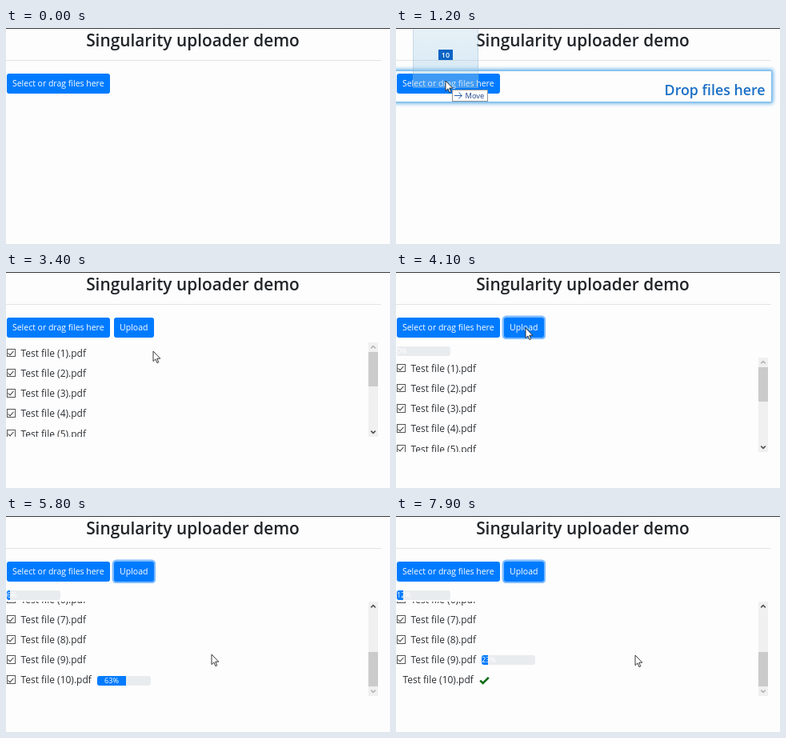
Write an HTML page that moves like this. It is 480 px wide and 270 px high and loops after 8 s.

```html
<!DOCTYPE html>
<html lang="en">
<head>
<meta charset="utf-8">
<title>Uploader demo</title>
<style>
@property --scroll { syntax: "<number>"; inherits: true; initial-value: 0; }
@property --pct { syntax: "<integer>"; inherits: true; initial-value: 0; }
@property --fill { syntax: "<number>"; inherits: true; initial-value: 0; }

html, body { margin: 0; width: 100%; height: 100%; overflow: hidden; }
body { background: #fdfdfd; }
*, ::before, ::after { box-sizing: border-box; }
.stage {
  position: relative; width: 480px; height: 270px; overflow: hidden;
  background: #fdfdfd; border-top: 1px solid #3a3a3c; color: #2b2f33;
  font: 12px/25.2px "Open Sans", "Noto Sans", sans-serif; white-space: nowrap;
}
.stage > * { position: absolute; margin: 0; }
.stage, .stage * { animation: 8s step-end infinite; animation-name: none; }

h1 { left: 0; top: -1px; width: 467px; text-align: center; color: #212529; font-size: 20.85px; font-weight: 600; line-height: 30px; }
.rule { left: 0; top: 39px; width: 469px; height: 1px; background: #e3e3e4; }
.btn {
  top: 56px; height: 24.5px; border-radius: 3px; background: #007bff; color: #fff;
  font-size: 10.5px; line-height: 25.5px; text-align: center;
}
.pick { left: 1px; width: 128.5px; }
.upload { left: 135px; width: 49.5px; }
.stage .upload { animation-name: after-drop, focus; }

.zone {
  left: -6px; top: 51.5px; width: 475.5px; height: 40px; padding-right: 7px;
  border: 1px solid #7dbdec; box-shadow: 0 0 5px 1px #4da3e6;
  color: #1a6fc6; font-size: 17.8px; font-weight: 600; line-height: 46px; text-align: right;
}
.stage .zone { animation-name: drag-over; }

/* progress bars: the fill trails the printed percentage */
.bar { display: block; width: 67px; height: 12px; border-radius: 3px; background: #e9ecef; overflow: hidden; }
.bar i {
  display: block; width: calc(var(--fill) * 1%); height: 100%; background: #007bff; color: #fff;
  font: 9.2px/12px "Open Sans", "Noto Sans", sans-serif; text-align: center;
}
.bar i::after { counter-reset: n var(--pct); content: counter(n) "%"; }
.total { left: 1px; top: 92px; }
.stage .total { animation-name: after-click, total; animation-timing-function: step-end, linear; }
.row .bar { margin: 1px 0 0 7px; }
.stage .ten { animation-name: ten; animation-timing-function: linear; }
.stage .nine { animation-name: second-file, nine; animation-timing-function: step-end, linear; }

/* file list */
.files { left: 0; top: 87px; width: 466px; height: 118px; overflow: hidden; }
.stage .files { animation-name: after-drop, shift, scroll; animation-timing-function: step-end, step-end, linear; }
.list { padding-top: .8px; transform: translateY(calc(var(--scroll) * -1px)); }
.row { position: relative; display: flex; align-items: center; height: 25.2px; padding-left: 18.5px; }
.row::before { content: ""; position: absolute; left: 1px; top: 7px; width: 10.5px; height: 10.5px; border: 1px solid #555; background: #fff; }
.row::after {
  content: ""; position: absolute; left: 4.3px; top: 8.2px; width: 4px; height: 7px;
  border: solid #444; border-width: 0 1.2px 1.2px 0; transform: rotate(42deg);
}
.stage .live { animation-name: before-done; }
.done { margin-top: -25.2px; padding-left: 8.5px; }
.stage .done { animation-name: second-file; }
.done::before, .done::after { display: none; }
.done svg { margin-left: 7px; }

.track { position: absolute; left: 453px; top: 0; width: 12px; height: 118px; background: #f0f0f0; }
.thumb { position: absolute; top: 11.5px; width: 12px; height: 43px; background: #cbcbcb; transform: translateY(calc(var(--scroll) * .359px)); }
.track svg { position: absolute; left: 0; color: #505050; }
.stage .up { top: 0; animation-name: up; }
.stage .down { bottom: 0; animation-name: down; }

/* pointer with the dragged files */
.pointer { left: 0; top: -1px; }
.stage .pointer { animation-name: move; animation-timing-function: ease-in-out; }
.pointer > * { position: absolute; }
.stage .drag { animation-name: before-drop; }
.drag > * { position: absolute; }
.ghost {
  left: -41px; top: -74px; width: 82px; height: 83px; border: 1px solid rgba(140, 170, 195, .3);
  background: linear-gradient(rgba(190, 218, 236, .3), rgba(150, 198, 230, .42));
}
.count { left: -9px; top: -39px; width: 18px; height: 13px; background: #0a63c4; color: #fff; font-size: 9px; font-weight: 600; line-height: 13px; text-align: center; }
.tip { left: 8px; top: 11px; width: 45px; height: 15px; padding-left: 15.5px; border: 1px solid #8f949a; background: #fff; color: #1c3f86; font-size: 9.3px; line-height: 13px; }
.tip svg { position: absolute; left: 1px; top: 1px; }
.arrow { left: -1px; top: -1px; }

@keyframes after-drop { 0% { opacity: 0 } 17.5%, 100% { opacity: 1 } }
@keyframes before-drop { 0% { opacity: 1 } 17.5%, 100% { opacity: 0 } }
@keyframes drag-over { 0% { opacity: 0 } 10% { opacity: 1 } 17.5%, 100% { opacity: 0 } }
@keyframes after-click { 0% { opacity: 0 } 48.75%, 100% { opacity: 1 } }
@keyframes focus { 0% { box-shadow: none } 48.75%, 100% { box-shadow: 0 0 0 2.4px rgba(0, 123, 255, .5) } }
@keyframes shift { 0% { transform: none } 48.75%, 100% { transform: translateY(19px) } }
@keyframes second-file { 0% { opacity: 0 } 90%, 100% { opacity: 1 } }
@keyframes before-done { 0% { opacity: 1 } 90%, 100% { opacity: 0 } }
@keyframes scroll {
  0%, 26.25% { --scroll: 0 }
  31.25% { --scroll: 61 }
  33.75%, 36.25% { --scroll: 142 }
  40%, 57.5% { --scroll: 0 }
  61.25% { --scroll: 75 }
  66.25%, 100% { --scroll: 142 }
}
@keyframes up {
  0%, 40% { color: #b4b4b4 }
  26.25%, 57.5%, 100% { color: #505050 }
}
@keyframes down {
  0%, 36.25% { color: #505050 }
  33.75%, 66.25%, 100% { color: #b4b4b4 }
}
@keyframes total {
  0%, 51.25% { --pct: 0; --fill: 0 }
  61.25% { --pct: 4; --fill: 3 }
  72.5% { --pct: 6; --fill: 6 }
  90% { --pct: 10; --fill: 10 }
  98.75%, 100% { --pct: 12; --fill: 12 }
}
@keyframes ten {
  0%, 51.25% { --pct: 0; --fill: 0 }
  61.25% { --pct: 36; --fill: 27 }
  72.5% { --pct: 63; --fill: 54 }
  86.25% { --pct: 100 }
  90%, 100% { --pct: 100; --fill: 100 }
}
@keyframes nine {
  0%, 90% { --pct: 0; --fill: 0 }
  98.75%, 100% { --pct: 23; --fill: 12 }
}
@keyframes move {
  0%, 1.25% { transform: translate(-120px, 209px) }
  10% { transform: translate(58px, 76px) }
  12.5%, 17.5% { transform: translate(62px, 66px) }
  23.75%, 31.25% { transform: translate(134px, 154px) }
  36.25% { transform: translate(138px, 150px) }
  42.5% { transform: translate(184px, 99px) }
  46.25%, 51.25% { transform: translate(162px, 70px) }
  57.5% { transform: translate(246px, 166px) }
  61.25% { transform: translate(249px, 170px) }
  72.5% { transform: translate(257px, 173px) }
  78.75% { transform: translate(300px, 174px) }
  83.75% { transform: translate(297px, 174px) }
  88.75%, 100% { transform: translate(299px, 174px) }
}
</style>
</head>
<body>
<div class="stage">
  <h1>Singularity uploader demo</h1>
  <div class="rule"></div>
  <div class="zone">Drop files here</div>
  <div class="btn pick">Select or drag files here</div>
  <div class="btn upload">Upload</div>
  <div class="bar total"><i></i></div>

  <div class="files">
    <div class="list">
      <div class="row">Test file (1).pdf</div>
      <div class="row">Test file (2).pdf</div>
      <div class="row">Test file (3).pdf</div>
      <div class="row">Test file (4).pdf</div>
      <div class="row">Test file (5).pdf</div>
      <div class="row">Test file (6).pdf</div>
      <div class="row">Test file (7).pdf</div>
      <div class="row">Test file (8).pdf</div>
      <div class="row">Test file (9).pdf<span class="bar nine"><i></i></span></div>
      <div class="row live">Test file (10).pdf<span class="bar ten"><i></i></span></div>
      <div class="row done">Test file (10).pdf
        <svg width="13" height="11"><path d="M1.2 5.6 4.7 9 11.8 1.8" fill="none" stroke="#0a6b14" stroke-width="2.6"/></svg>
      </div>
    </div>
    <div class="track">
      <div class="thumb"></div>
      <svg class="up" width="12" height="12"><path d="M3.2 7.4 6 4.6 8.8 7.4" fill="none" stroke="currentColor" stroke-width="1.5"/></svg>
      <svg class="down" width="12" height="12"><path d="M3.2 4.6 6 7.4 8.8 4.6" fill="none" stroke="currentColor" stroke-width="1.5"/></svg>
    </div>
  </div>

  <div class="pointer">
    <div class="drag">
      <div class="ghost"></div>
      <div class="count">10</div>
      <div class="tip">Move
        <svg width="12" height="11"><path d="M1 5.5H10.5M6.5 1.8 10.3 5.5 6.5 9.2" fill="none" stroke="#2a5db0"/></svg>
      </div>
    </div>
    <svg class="arrow" width="12" height="18"><path d="M1 1V13.6L3.9 10.9 5.9 15.6 7.8 14.8 5.8 10.2H9.8Z" fill="#fff" stroke="#222" stroke-width=".9"/></svg>
  </div>
</div>
</body>
</html>
```
